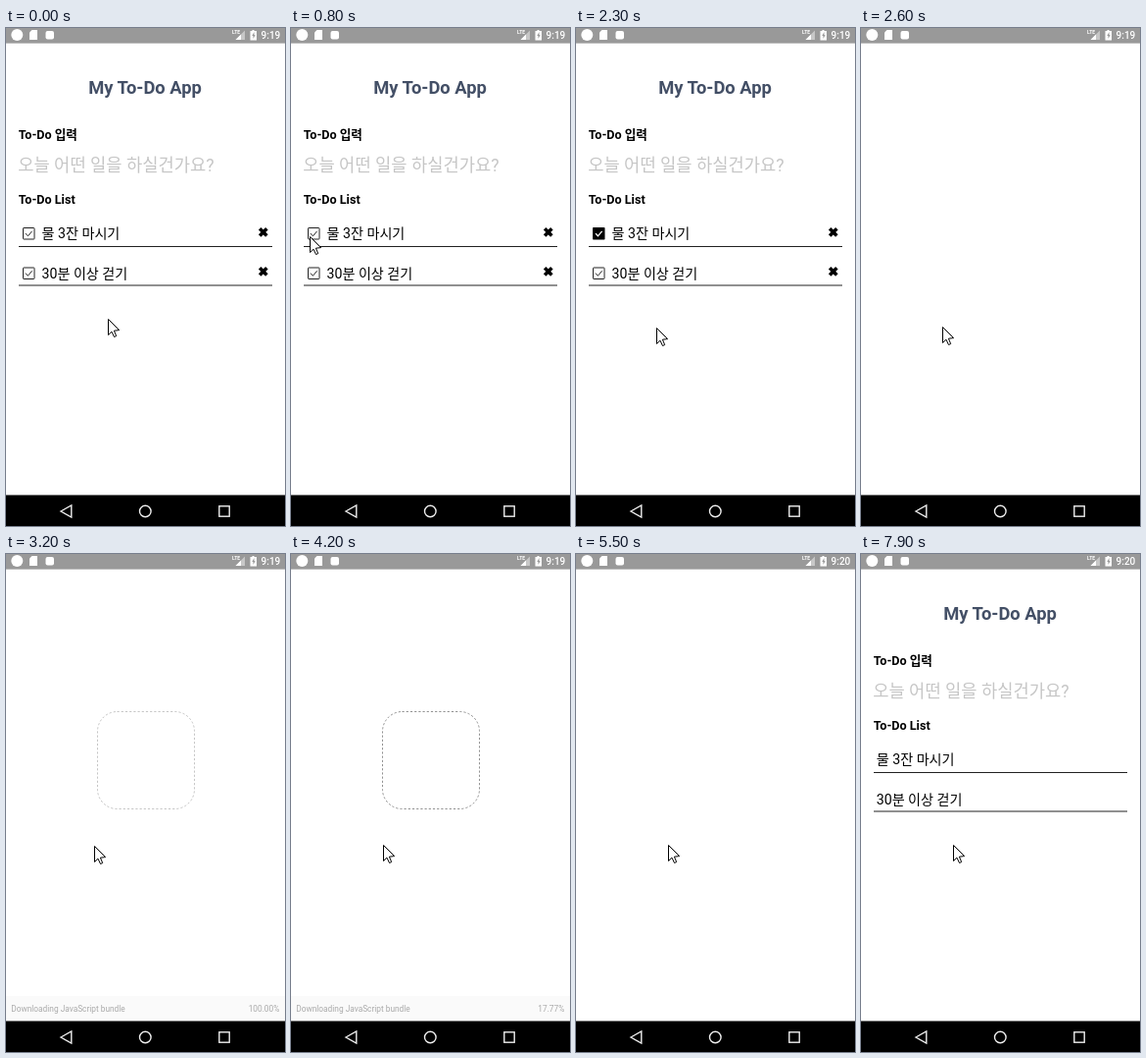
Recreate the animation shown at these times as an HTML page. Size 285 px wide and 507 px high, loop 8000 ms.

```html
<!DOCTYPE html>
<html lang="ko">
<head>
<meta charset="utf-8">
<title>To-Do App</title>
<style>
  html, body { margin: 0; width: 100%; height: 100%; overflow: hidden; background: #fff; }
  svg { display: block; width: 100%; height: 100%; }
  text { font-family: Roboto, "Noto Sans CJK KR", "Noto Sans CJK", sans-serif; }
  .title { font-size: 18.35px; font-weight: 700; fill: #434f66; text-anchor: middle; }
  .label { font-size: 12.6px; font-weight: 700; }
  .hint { font-size: 17.7px; fill: #c6c6c6; }
  .item { font-size: 14.1px; }
  .note { font-size: 8.32px; fill: #aaa; }
  .end { text-anchor: end; }
  .line { fill: none; }
</style>
</head>
<body>
<svg viewBox="0 0 285 507">
  <defs>
    <g id="boxOpen">
      <rect class="line" x="17.5" y="-6" width="11.5" height="11.5" rx=".6" stroke="#222"/>
      <path class="line" d="M20 -.4l2.4 2.7 4.2-5" stroke="#222"/>
    </g>
    <g id="boxFull">
      <rect x="17" y="-6.5" width="12.5" height="12.5" rx=".8"/>
      <path class="line" d="M20 -.4l2.4 2.7 4.2-5" stroke="#fff" stroke-width="1.3"/>
    </g>
    <path id="cross" d="M259.2 -5.3l7.2 7.2m0-7.2l-7.2 7.2" stroke="#000" stroke-width="3.6"/>
  </defs>
  <rect width="285" height="507" fill="#fff"/>

  <g id="app">
    <text class="title" x="142" y="67">My To-Do App</text>
    <text class="label" x="12.8" y="113">To-Do 입력</text>
    <text class="hint" x="12.2" y="146">오늘 어떤 일을 하실건가요?</text>
    <text class="label" x="12.8" y="178.5">To-Do List</text>
    <text class="item" y="214.2">물 3잔 마시기</text>
    <text class="item" y="254.6">30분 이상 걷기</text>
    <path d="M13 222.5H272M13 262H272" stroke="#222"/>
    <g id="icons">
      <use id="firstBox" href="#boxOpen" y="209.5"/>
      <use href="#boxOpen" y="250"/>
      <use href="#cross" y="209.5"/>
      <use href="#cross" y="249.5"/>
    </g>
  </g>

  <g id="loading">
    <rect id="frame" class="line" x="93.5" y="160.5" width="99" height="99" rx="20" stroke="#777" stroke-dasharray="2.2 2"/>
    <rect y="450" width="285" height="26" fill="#fafafa"/>
    <text class="note" x="5.3" y="466">Downloading JavaScript bundle</text>
    <text class="note end" id="percent" x="279.3" y="466"></text>
  </g>

  <rect width="285" height="15.6" fill="#999"/>
  <g fill="#fff">
    <circle cx="11.3" cy="7" r="6"/>
    <path d="M26.5 2h5.5v10h-8V4.5z"/>
    <rect x="40.5" y="3" width="8.5" height="8.5" rx="2"/>
    <text x="231" y="6" font-size="5" font-weight="700">LTE</text>
    <path d="M244 2.5V12h-9.5z" opacity=".45"/>
    <path d="M240 6.5V12h-5.5z"/>
    <path d="M251.5 2h2V3H256v9.5h-6.5V3h2z"/>
    <path d="M253.5 4l-2.2 4h1.2v3l2.2-4h-1.2z" fill="#999"/>
    <text id="clock" class="end" x="280.3" y="11" font-size="10" font-weight="500"></text>
  </g>

  <rect y="475.5" width="285" height="32"/>
  <g class="line" stroke="#eee" stroke-width="1.4">
    <path d="M56 492l10.8-6v12z"/>
    <circle cx="142.3" cy="492" r="5.8"/>
    <rect x="217.8" y="486.8" width="10.4" height="10.4"/>
  </g>

  <path id="cursor" d="M.5 .5V16.5L4 13.2 6.5 18.5 8.7 17.6 6.4 12.2 11.6 11.6z" fill="#fff" stroke="#000" stroke-linejoin="round"/>
</svg>
<script>
const LOOP = 8000, TICK = 100;
const $ = id => document.getElementById(id);
const show = (id, visible) => $(id).setAttribute("display", visible ? "inline" : "none");

// Each move: start time, end time, destination.
const start = [104, 296];
const moves = [
  [100, 800, [19, 212]],
  [1700, 2300, [82, 305]],
  [2500, 3000, [90, 297]],
  [3300, 3500, [94, 296]],
];
const progress = [
  [0, "100.00"], [3400, "0.17"], [3500, "2.31"], [3800, "8.53"], [3900, "13.29"],
  [4200, "17.77"], [4300, "24.62"], [4500, "31.85"], [4800, "36.40"],
  [5000, "48.26"], [5100, "63.94"], [5200, "82.51"], [5300, "100.00"],
];
const frameOpacity = [[0, .35], [3200, .42], [3400, .6], [3500, .8]];

const latest = (steps, t) => steps.filter(([at]) => at <= t).pop()[1];
const ease = p => p * p * (3 - 2 * p);

function cursorAt(t) {
  let pos = start;
  for (const [from, to, target] of moves) {
    const p = ease(Math.min(1, Math.max(0, (t - from) / (to - from))));
    pos = pos.map((v, i) => v + (target[i] - v) * p);
  }
  return pos.map(Math.round);
}

function draw(t) {
  const reloaded = t >= 7900;
  show("app", t < 2600 || reloaded);
  show("icons", !reloaded);
  show("loading", t >= 2700 && t < 5500);
  $("firstBox").setAttribute("href", t >= 1800 ? "#boxFull" : "#boxOpen");
  for (const item of document.querySelectorAll(".item")) item.setAttribute("x", reloaded ? 15.8 : 36.6);
  $("frame").setAttribute("opacity", latest(frameOpacity, t));
  $("percent").textContent = latest(progress, t) + "%";
  $("clock").textContent = t < 4300 ? "9:19" : "9:20";
  $("cursor").setAttribute("transform", `translate(${cursorAt(t)})`);
}

const origin = performance.now();
function tick() {
  const t = (performance.now() - origin) % LOOP;
  draw(Math.floor(t / TICK) * TICK);
  requestAnimationFrame(tick);
}
tick();
</script>
</body>
</html>
```
